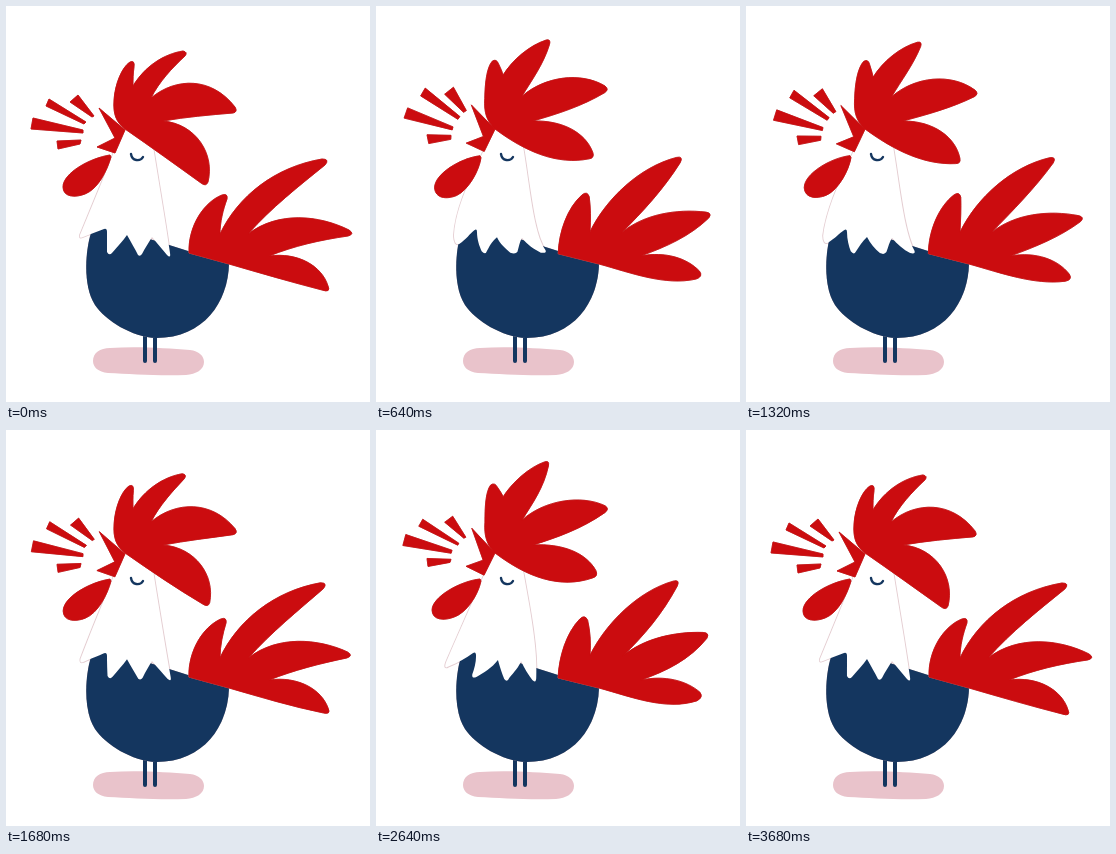
These frames come from a looping animation (364x396 px, 3.72 s). An HTML page:

```html
<!DOCTYPE html>
<html lang="en">
<head>
<meta charset="utf-8">
<title>Crowing rooster</title>
<style>
  html, body { margin: 0; width: 100%; height: 100%; overflow: hidden; background: #fff; }
  svg { display: block; width: 100%; height: 100%; }
  .red { fill: #cb0c0f; stroke: #cb0c0f; stroke-width: .8; stroke-linejoin: round; }
  .navy { fill: #14365f; }
  .line { fill: none; stroke: #14365f; stroke-linecap: round; }
  .soft { filter: drop-shadow(0 0 .6px #b99); }
</style>
</head>
<body>
<svg viewBox="0 0 364 396">
  <path fill="#e9c3cb" d="M104 342 C130 340 160 342 184 344 C193 345 198 350 198 356 C198 364 190 368 180 369 C152 370 124 368 102 367 C92 366 87 361 87 355 C87 347 94 342 104 342 Z"/>
  <path class="line" stroke-width="4" d="M139 328 V355 M149 328 V355"/>
  <path id="hem" fill="none" stroke="#e4cdd1" stroke-width="1.8"/>
  <path class="navy soft" d="M85 227 C88 223 94 221 101 220 L160 238 L223 258 C222 296 198 332 150 332 C126 331 100 315 89 299 C77 281 79 246 85 227 Z"/>
  <path id="bib" fill="#fff"/>
  <g class="red soft">
    <path id="wattle"/>
    <path id="beak"/>
    <path id="comb"/>
    <path id="tail"/>
    <path id="rays"/>
  </g>
  <path class="line" stroke-width="2.4" d="M125 148 C126 155 134 156 137 151"/>
</svg>
<script>
const LOOP = 3720, SWING = LOOP / 2, STEP = 40;

// Each part has a rest pose, a pose for the first swing and, if different, one for the second.
const parts = {
  comb: [
    "M119 123 C110 116 107 108 108 94 C109 78 116 61 124 56 Q129 54 128 61 C127 68 127 73 127 80 C139 60 158 48 177 45 Q182 46 179 50 C166 62 153 76 145 92 C170 71 206 71 229 101 Q232 106 227 107 C203 109 180 111 157 115 C190 118 209 148 202 176 Q200 181 195 177 C170 159 145 141 119 123 Z",
    "M119 123 C111 115 108 106 109 92 C109 78 109 62 114 55 Q118 52 121 57 C124 61 126 63 127 66 C136 52 152 37 168 31 Q173 29 172 35 C168 57 157 73 146 90 C168 70 205 64 229 74 Q234 77 229 81 C206 98 182 107 157 115 C186 113 210 121 221 138 Q224 144 218 146 C185 159 152 148 119 123 Z"
  ],
  tail: [
    "M183 247 C182 220 198 196 216 189 Q222 187 221 193 C217 204 214 216 214 228 C232 190 269 161 316 153 Q324 153 319 159 C293 180 265 202 242 228 C272 205 313 209 343 224 Q349 228 342 230 C314 234 288 240 263 250 C292 246 316 260 322 280 Q325 287 316 284 C285 276 254 267 223 258 Z",
    "M182 248 C183 227 190 203 203 189 Q208 184 211 190 C214 201 215 212 214 225 C230 193 262 161 296 151 Q303 149 300 156 C286 184 268 206 247 226 C267 209 297 201 326 201 Q333 201 330 207 C314 229 291 241 265 250 C289 245 310 250 324 261 Q328 266 321 270 C290 281 256 267 223 258 Z"
  ],
  bib: [
    "M119 118 C104 156 89 193 74 229 Q73 233 77 231 C84 228 91 226 98 223 Q101 222 101 226 C101 233 101 240 101 246 Q103 250 106 247 C111 241 117 235 121 229 C125 236 129 243 132 249 Q134 251 136 248 C139 242 143 236 146 231 C151 237 157 244 161 249 Q165 253 164 247 C159 212 153 178 147 140 Z",
    "M119 118 C108 150 78 190 79 230 Q80 242 85 240 C92 235 95 228 98 225 Q101 222 101 226 C101 234 104 240 107 245 Q111 249 112 245 C114 241 115 236 121 232 C124 239 129 242 135 246 Q141 248 143 245 C144 241 144 235 146 232 C151 239 158 243 166 246 Q173 246 171 243 C157 232 154 180 147 140 Z",
    "M119 118 C104 156 86 195 70 232 Q67 240 72 237 C82 233 90 228 97 223 Q100 221 100 226 C100 233 98 239 96 244 Q95 249 100 247 C107 243 116 238 122 230 C124 238 126 244 128 249 Q131 253 133 248 C138 242 143 237 145 231 C148 238 152 245 156 250 Q160 254 160 247 C162 220 154 178 147 140 Z"
  ],
  beak: [
    "M93 102 L119 124 L109 147 L91 141 L109 132 Z",
    "M96 98 L119 123 L108 145 L90 136 L107 130 Z"
  ],
  wattle: [
    "M104 149 C84 152 57 167 57 181 C57 191 69 192 79 188 C92 183 101 165 105 151 Z",
    "M104 150 C85 152 59 168 59 182 C60 193 71 194 81 190 C93 184 104 164 105 152 Z",
    "M104 149 C84 151 56 167 56 180 C56 190 68 191 78 187 C90 183 102 166 105 151 Z"
  ],
  rays: [
    "M64 96 L72 89 L88 110 L86 111 Z M43 93 L40 100 L78 118 L80 116 Z M27 112 L25 123 L77 127 L77 124 Z M51 135 L52 143 L74 138 L75 134 Z",
    "M70 86 L79 79 L91 103 L88 105 Z M51 79 L46 87 L83 112 L85 109 Z M33 99 L29 109 L76 123 L77 120 Z M51 127 L53 136 L75 132 L75 128 Z",
    "M69 92 L77 86 L90 107 L88 108 Z M47 89 L43 96 L82 115 L83 113 Z M30 104 L27 115 L75 123 L76 120 Z M51 128 L52 136 L74 132 L75 129 Z"
  ]
};

const el = id => document.getElementById(id);

function mix(a, b, k) {
  const to = b.match(/\d+/g);
  let i = 0;
  return a.replace(/\d+/g, n => (+n + (to[i++] - n) * k).toFixed(2));
}

function draw(t) {
  const k = (1 - Math.cos(2 * Math.PI * t / SWING)) / 2;
  const second = t >= SWING;
  for (const id in parts) {
    const [rest, first, other = first] = parts[id];
    el(id).setAttribute("d", mix(rest, second ? other : first, k));
  }
  el("hem").setAttribute("d", el("bib").getAttribute("d"));
}

let start;
function tick(now) {
  start ??= now;
  const t = (now - start) % LOOP;
  draw(Math.floor(t / STEP) * STEP);
  requestAnimationFrame(tick);
}

draw(0);
requestAnimationFrame(tick);
</script>
</body>
</html>
```
